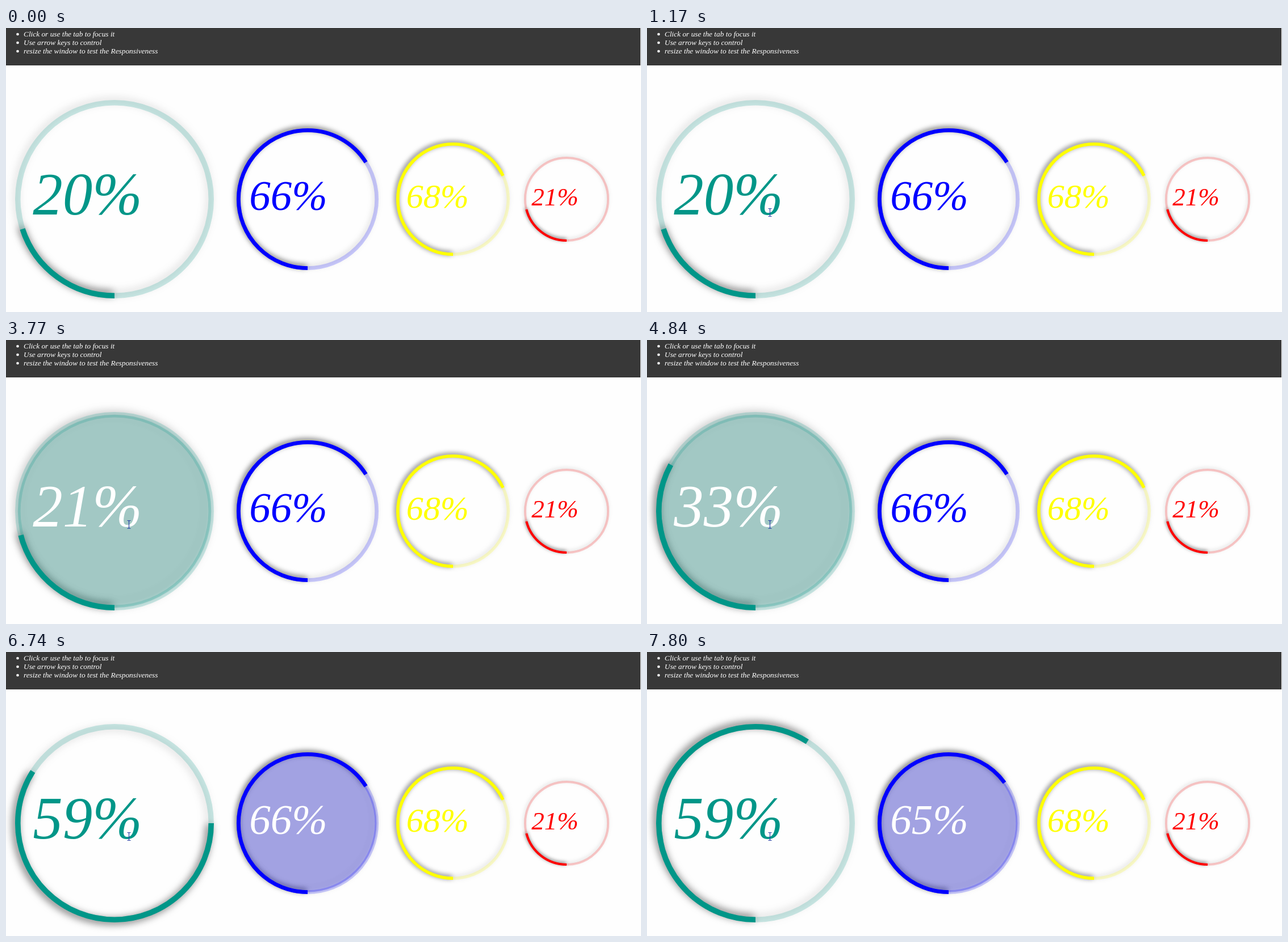
An HTML page for the animation above (8000 ms loop, 1118 px wide and 501 px high).

```html
<!DOCTYPE html>
<html lang="en">
<head>
<meta charset="utf-8">
<title>Ring sliders</title>
<style>
  html, body { margin: 0; width: 100%; height: 100%; overflow: hidden; background: #fefefe; }
  svg { display: block; width: 1118px; height: 501px; }
  text { font-family: "Liberation Serif", "Times New Roman", Times, serif; font-style: italic; white-space: pre; }
</style>
</head>
<body>
<svg id="stage" viewBox="0 0 1118 501"></svg>
<script>
const LOOP = 8000, MID_Y = 302;
const stage = document.getElementById('stage');

function add(parent, tag, attrs, content) {
  const el = document.createElementNS('http://www.w3.org/2000/svg', tag);
  for (const k in attrs) el.setAttribute(k, attrs[k]);
  if (content) el.textContent = content;
  return parent.appendChild(el);
}

// Header with its list
add(stage, 'rect', { width: 1117, height: 66, fill: '#383838' });
['Click or use the tab to focus it',
 'Use arrow keys to control',
 'resize the window to test the Responsiveness'].forEach((line, i) => {
  add(stage, 'circle', { cx: 20.5, cy: 11 + i * 15, r: 2.3, fill: '#fff' });
  add(stage, 'text', { x: 31, y: 15 + i * 15, 'font-size': 13.333, fill: '#fff' }, line);
});

function makeRing(x, size, color, value) {
  const width = size * 0.0272, r = (size - width) / 2;
  const g = add(stage, 'g', {});
  g.style.filter =
    `drop-shadow(${-size / 100}px ${size / 100}px ${size / 50}px rgba(0,0,0,.6))`;
  const base = { r, stroke: color, 'stroke-width': width };
  const track = add(g, 'circle', { ...base, fill: color, 'stroke-opacity': 0.2 });
  const arc = add(g, 'circle', { ...base, fill: 'none', pathLength: 100 });
  const label = add(stage, 'text', {
    x: x - size * 0.411, y: MID_Y + size * 0.0762, 'font-size': size * 0.3
  });
  function set(value, focused, angle) {
    g.setAttribute('transform', `translate(${x} ${MID_Y}) rotate(${angle})`);
    track.setAttribute('fill-opacity', focused ? 0.25 : 0);
    arc.setAttribute('stroke-dasharray', `${value} 100`);
    label.setAttribute('fill', focused ? '#fff' : color);
    label.textContent = value + '%';
  }
  set(value, false, 90);
  return set;
}

const teal = makeRing(191, 350, '#009688', 20);
const blue = makeRing(531, 250, '#0000ff', 66);
makeRing(787, 200, '#ffff00', 68);
makeRing(987, 150, '#ff0000', 21);

// Mouse pointer: arrow on the page, I-beam on text
const arrow = add(stage, 'path', {
  d: 'M.5 .5V16.5L4.2 13L6.8 18.6L9 17.6L6.5 12.1H11.7Z',
  fill: '#fff', stroke: '#000', 'stroke-width': 1
});
const beam = add(stage, 'path', {
  d: 'M-3 -6.5H-1L0 -5.5L1 -6.5H3M0 -5.5V6.5M-3 7.5H-1L0 6.5L1 7.5H3',
  fill: 'none', stroke: '#2c44a8', 'stroke-width': 1.2
});

// Screen updates come in bursts: start, end, number of steps
const bursts = [
  [270, 1050, 11], [1170, 1170, 1], [4320, 4540, 3],
  [4750, 5520, 10], [5580, 6020, 5], [6740, 7370, 7]
];
const ticks = bursts.flatMap(([a, b, n]) =>
  Array.from({ length: n }, (_, i) => a + (b - a) * i / Math.max(1, n - 1)));
const snap = t => ticks.reduce((last, tick) => tick <= t ? tick : last, 0);

const clamp = u => Math.min(1, Math.max(0, u));
const mix = (a, b, u) => a + (b - a) * u;

// Quarter turn back into place after losing the pointer or the focus
function turn(t, start) {
  return t < start ? 90 : 90 * (1 - (1 - clamp((t - start) / 630)) ** 2.3);
}

// Arrow key held down
const counts = [[4320, 22], [4540, 26], [4750, 31], [5520, 50], [5580, 51], [6020, 59]];
function tealValue(t, s) {
  if (t < 3770) return 20;
  if (t < 4320) return 21;
  const i = counts.findIndex(c => c[0] > s);
  if (i < 0) return 59;
  const [a, from] = counts[i - 1], [b, to] = counts[i];
  return Math.round(mix(from, to, (s - a) / (b - a)));
}

function movePointer(t, s) {
  const u = 1 - (1 - clamp((s - 270) / 780)) ** 3;
  const x = mix(936, 216.5, u), y = mix(472, 325, u);
  const onText = x < 238;
  arrow.setAttribute('visibility', t >= 270 && !onText ? 'visible' : 'hidden');
  beam.setAttribute('visibility', onText ? 'visible' : 'hidden');
  (onText ? beam : arrow).setAttribute('transform', `translate(${x} ${y})`);
}

function draw(t) {
  const s = snap(t);
  teal(tealValue(t, s), t >= 2680 && t < 6740, turn(s, 6740));
  blue(t < 7800 ? 66 : 65, t >= 6740, t < 2000 ? turn(s, 540) : 90);
  movePointer(t, s);
}

const begin = performance.now();
function frame() {
  draw((performance.now() - begin) % LOOP);
  requestAnimationFrame(frame);
}
draw(0);
requestAnimationFrame(frame);
</script>
</body>
</html>
```
